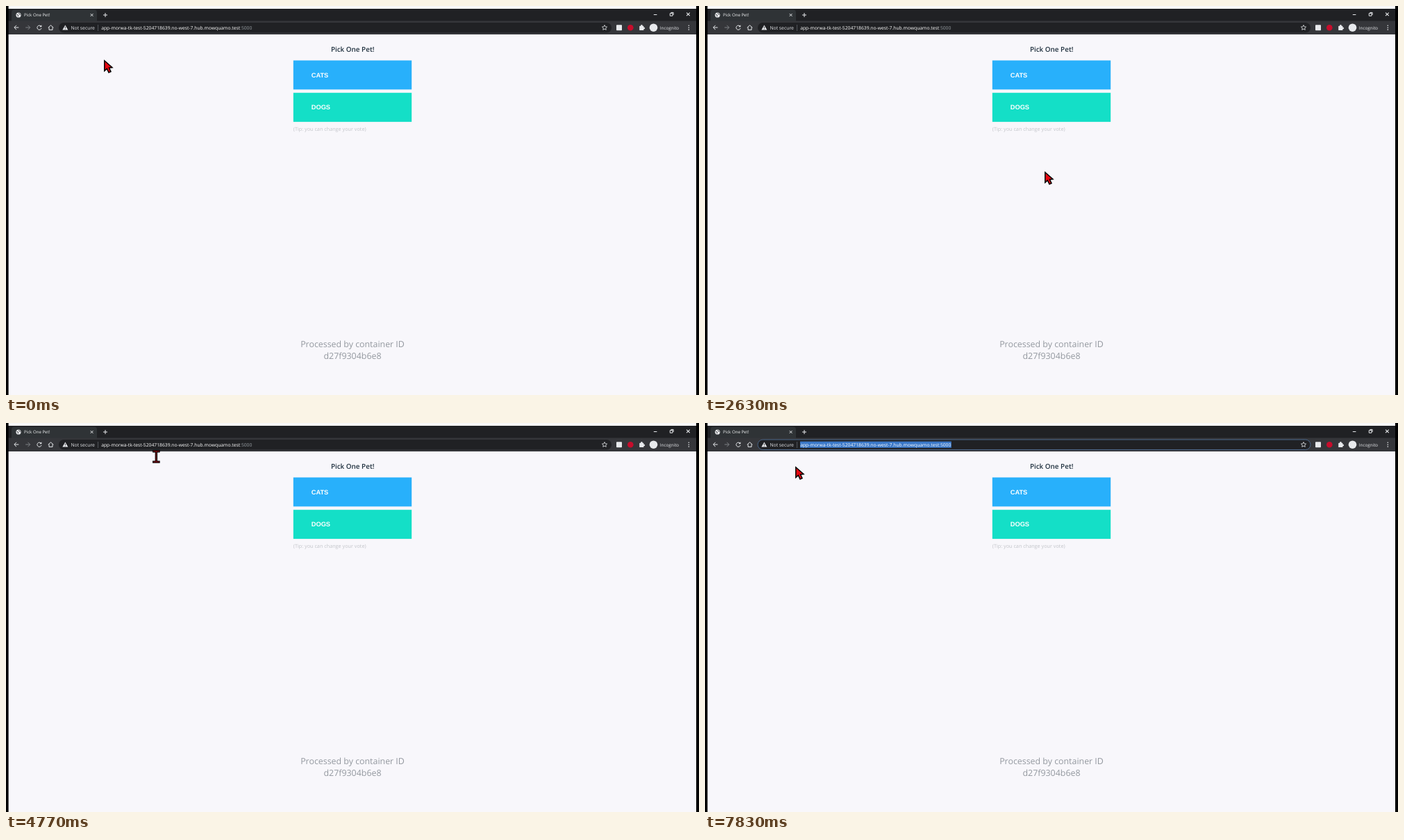
An HTML page for the animation above (8 s loop, 998 by 561 pixels).

```html
<!DOCTYPE html>
<html lang="en">
<head>
<meta charset="utf-8">
<title>Pick One Pet!</title>
<style>
  html, body { margin: 0; width: 100%; height: 100%; overflow: hidden; background: #000; }
  svg { display: block; width: 998px; height: 561px; }
  text { font-family: "Open Sans", "Noto Sans", sans-serif; text-rendering: geometricPrecision; }
  .mid { text-anchor: middle; }
  .btn { font: bold 9.3px "Liberation Sans", Arial, sans-serif; fill: #fff; }
  .line { fill: none; stroke: #e8eaed; }
  .solid { fill: #e8eaed; }
  #mark, #ring, .picked #beam, .field #arrow, #beam { visibility: hidden; }
  .field #beam, .picked #mark, .picked #ring { visibility: visible; }
  #port { fill: #9aa0a6; }
  .picked #port { fill: #fff; }
</style>
</head>
<body>
<svg id="stage" viewBox="0 0 998 561">
  <defs>
    <path id="plus" d="M-3 0H3M0-3V3"/>
    <path id="back" d="M3.3 0H-3M0-3.2L-3.2 0L0 3.2"/>
  </defs>

  <!-- window -->
  <rect x="3.6" width="990.4" height="4" fill="#fafafa"/>
  <rect x="3.6" y="4" width="990.4" height="18" fill="#202124"/>
  <rect x="8" y="5.5" width="123" height="20" rx="4" fill="#2f3336"/>
  <rect x="3.6" y="21.5" width="990.4" height="19.5" fill="#35363a"/>
  <rect x="76" y="24" width="796" height="14.5" rx="7.2" fill="#202124"/>
  <rect id="ring" x="76" y="24" width="796" height="14.5" rx="7.2" fill="none" stroke="#51749f" stroke-width=".8"/>
  <rect x="3.6" y="41" width="990.4" height="520" fill="#f8f7fb"/>

  <!-- tab strip -->
  <circle class="solid" cx="18" cy="13" r="3.6"/>
  <path d="M15.5 12l2 1.2-.4 2M18.5 10.3l.8 1.5 1.6.4" fill="none" stroke="#35363a"/>
  <text x="26" y="15.2" font-size="6.1" fill="#f1f3f4">Pick One Pet!</text>
  <g class="line">
    <use href="#plus" transform="translate(123.6 13) rotate(45) scale(.9)"/>
    <use href="#plus" transform="translate(143 13)"/>
    <use href="#plus" transform="translate(982.4 11.9) rotate(45) scale(1.1)"/>
    <path d="M932.8 12.5h4.6M956.3 10.6h3.6v3.6h-3.6zM957.5 9.4h3.6V13"/>
  </g>

  <!-- toolbar -->
  <g class="line">
    <use href="#back" x="15" y="31"/>
    <use href="#back" transform="translate(31.5 31) scale(-1 1)" stroke="#7d8084"/>
    <path d="M50.4 29.2A3.1 3.1 0 1 0 51 32"/>
    <path d="M60.7 31.2L64.5 27.8L68.3 31.2M62 30.6v3.8h5v-3.8"/>
    <path d="M132.5 27v9" stroke="#5f6368" stroke-width=".8"/>
    <polygon id="star" stroke-width=".8"/>
  </g>
  <path class="solid" d="M51.3 27.3v2.9h-2.9zM85.3 27.4l4 7h-8z"/>
  <path d="M85.3 29.7v2.2M85.3 32.6v.9" stroke="#202124" stroke-width=".9"/>
  <text x="93.4" y="33.6" font-size="6.83" fill="#e3e5e8">Not secure</text>
  <rect id="mark" x="137" y="26.6" width="217.8" height="9.2" fill="#3a78c8"/>
  <text x="137.2" y="33.6" font-size="6.78" fill="#fff">app-morwa-tk-test-5204718639.no-west-7.hub.mowquamo.test<tspan id="port">:5000</tspan></text>
  <g class="solid">
    <rect x="879" y="27.2" width="8" height="8" rx=".8"/>
    <rect x="912.2" y="28.8" width="6.2" height="6.2" rx=".6"/>
    <circle cx="915.4" cy="28.4" r="1.3"/>
    <circle cx="918.8" cy="32" r="1.3"/>
    <circle cx="932.5" cy="31.2" r="5.8"/>
    <text x="941.8" y="33.5" font-size="6.3">Incognito</text>
    <path d="M983.3 28.3v6" fill="none" stroke="#e8eaed" stroke-width="1.6" stroke-linecap="round" stroke-dasharray="0 2.9"/>
  </g>
  <circle cx="899.3" cy="31.2" r="4.3" fill="#c70d2c"/>

  <!-- page -->
  <text class="mid" x="499.2" y="66.4" font-size="9.9" font-weight="600" fill="#1e2f3d">Pick One Pet!</text>
  <rect x="413.8" y="78.5" width="170.4" height="41.9" fill="#28b0fb"/>
  <rect x="413.8" y="125.2" width="170.4" height="41.9" fill="#14dfc7"/>
  <text class="btn" x="439.7" y="102.5">CATS</text>
  <text class="btn" x="439.7" y="149.3">DOGS</text>
  <text x="413.8" y="180" font-size="7.26" fill="#c2c4c9">(Tip: you can change your vote)</text>
  <g class="mid" font-size="12.4" fill="#93989f">
    <text x="499" y="492.4">Processed by container ID</text>
    <text x="499" y="509.4">d27f9304b6e8</text>
  </g>

  <g id="pointer">
    <path id="arrow" d="M.8 1.8V16.6L4.3 13.4L7 19L10 17.6L7.5 12.2L12 11.7Z" fill="#e80610" stroke="#000" stroke-width="1.5"/>
    <g id="beam" fill="none">
      <path d="M-5.3-7.7H5.3M-5.3 7.7H5.3M0-7.7V7.7" stroke="#000" stroke-width="3.4"/>
      <path d="M-4.3-7.7H4.3M-4.3 7.7H4.3M0-7.7V7.7" stroke="#7c0a12" stroke-width="1.3"/>
    </g>
  </g>
</svg>
<script>
const LOOP = 8000, SELECT_AT = 6700, HOME = [141, 77];
// eased moves with rests between: start, end, then the place reached
const moves = [
  [430, 1030, 499, 262],
  [1570, 2030, 489, 238],
  [2630, 3300, 200, 84],
  [3700, 3930, 157, 54],
  [4170, 4550, 335, 50],
  [4550, 4970, 115, 47],
  [5630, 6370, 210.5, 52],
  [6700, 7030, 203, 43],
  [7500, 7830, 130, 62]
];
const stage = document.getElementById("stage");
const pointer = document.getElementById("pointer");

const ease = u => u * u * (3 - 2 * u);
const clamp = u => Math.min(1, Math.max(0, u));

function place(t) {
  let [x, y] = HOME;
  for (const [from, to, tx, ty] of moves) {
    const k = ease(clamp((t - from) / (to - from)));
    x += (tx - x) * k;
    y += (ty - y) * k;
  }
  return [x, y];
}

function draw(now) {
  const t = now % LOOP, [x, y] = place(t);
  pointer.setAttribute("transform", `translate(${x} ${y})`);
  stage.classList.toggle("field", x > 131 && y < 53.5);
  stage.classList.toggle("picked", t >= SELECT_AT);
}

function star(cx, cy, r) {
  return Array.from({ length: 10 }, (_, i) => {
    const a = i * Math.PI / 5, d = i % 2 ? r * .48 : r;
    return [cx + d * Math.sin(a), cy - d * Math.cos(a)];
  }).join(" ");
}
document.getElementById("star").setAttribute("points", star(862, 31.3, 3.8));

const start = performance.now();
function tick() {
  draw(performance.now() - start);
  requestAnimationFrame(tick);
}
tick();
</script>
</body>
</html>
```
